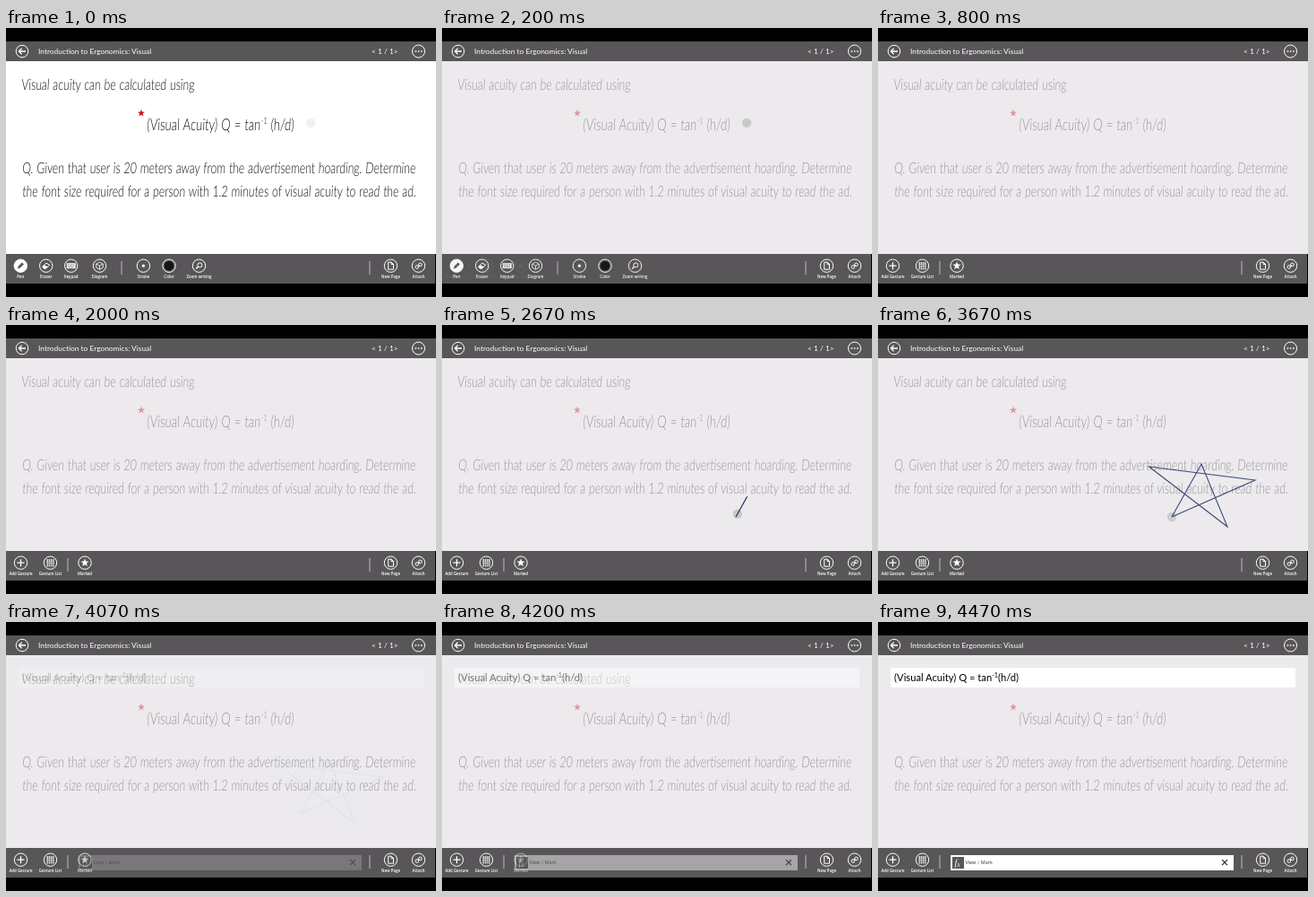
An HTML page that plays this animation: 480 px wide and 300 px high, repeating every 4.94 s.

```html
<!DOCTYPE html>
<html lang="en">
<head>
<meta charset="utf-8">
<title>Gesture marking</title>
<style>
  html, body { margin: 0; height: 100%; overflow: hidden; background: #000; }
  svg { display: block; width: 100%; height: 100%; }
  text { font-family: Lato, sans-serif; }
  .hand { font-size: 12.2px; font-weight: 300; word-spacing: .6px; fill: #111; }
  .title { font-size: 8.4px; fill: #fff; }
  .label { font: 600 4.4px "Open Sans", sans-serif; fill: #fff; text-anchor: middle; }
  .icon { fill: none; stroke: #fff; stroke-width: 1; }
  .solid { fill: #fff; stroke: none; }
  .bar { fill: #595659; stroke: none; }
  .rule { stroke: #d6d5d6; stroke-width: .8; }
</style>
</head>
<body>
<svg id="stage" viewBox="0 0 480 300"></svg>
<script>
const LOOP = 4940, TICK = 1000 / 15;
const corners = [[328, 214], [361, 155], [390, 225], [302.5, 158], [421, 173], [328, 214]];

const starPoints = (x, y, r) => Array.from({ length: 10 }, (_, i) => {
  const a = i * Math.PI / 5, d = i % 2 ? r * 0.42 : r;
  return `${(x + d * Math.sin(a)).toFixed(2)},${(y - d * Math.cos(a)).toFixed(2)}`;
}).join(' ');

// Tall, slightly slanted lettering for everything written with the pen.
const hand = (x, y, text, size = 12.2) =>
  `<text class="hand" style="font-size:${size}px" transform="matrix(1 0 -.08 1.4 ${x} ${y})">${text}</text>`;

const icon = (x, label, glyph, ring = 'none') => `
  <g class="icon" transform="translate(${x} 265.2)"><circle r="7.2" fill="${ring}"/>${glyph}</g>
  <text class="label" x="${x}" y="279">${label}</text>`;

const rule = x => `<path class="rule" d="M${x} 260v15"/>`;

const glyphs = {
  pen: '<path class="bar" d="M-3.4 3.4l1-3 4-4 2 2-4 4z"/>',
  eraser: '<path d="M-4 1l4-4 4 2-4 4h-2.4z"/><path class="solid" d="M-4 1l2-2 4 2-2 2h-2.4z"/>',
  keypad: '<path class="solid" d="M-5-3h10v6h-10z"/><path d="M-4-1.4h8M-4 .2h8M-3 1.8h6" stroke="#595659" stroke-width=".8" stroke-dasharray="1 .6"/>',
  diagram: '<path d="M0-4l3.8 2v4l-3.8 2-3.8-2v-4zM-3.8-2l3.8 2 3.8-2M0 0v4" stroke-width=".8"/>',
  dot: '<circle class="solid" r="1.6"/>',
  ink: '<circle r="5.2" fill="#151315" stroke="none"/>',
  zoom: '<circle cx=".8" cy="-.8" r="2.5"/><path d="M-1 1l-2.4 2.4" stroke-width="1.4"/>',
  page: '<path d="M-2.8-4h3.6l2.2 2.2v5.8h-5.8zM.6-4v2.4h2.4"/>',
  attach: '<circle cx="-1.7" cy="1.3" r="1.8"/><circle cx="1.9" cy="-1.3" r="1.8"/><path d="M-.8.6l1.8-1.2"/>',
  plus: '<path d="M-4 0h8M0-4v8" stroke-width="1.3"/>',
  grid: '<path d="M-4-3.3h8M-4-1.1h8M-4 1.1h8M-4 3.3h8" stroke-width="1.5" stroke-dasharray="1.5 .67"/>',
  star: `<polygon class="solid" points="${starPoints(0, 0, 4.8)}"/>`
};

const stage = document.getElementById('stage');
stage.innerHTML = `
  <path fill="#fff" d="M0 37h480v215H0z"/>
  ${hand(17, 68.8, 'Visual acuity can be calculated using')}
  ${hand(157, 114.3, '(Visual Acuity) Q = tan<tspan font-size="7.5" dy="-5.5">-1</tspan><tspan dy="5.5"> (h/d)</tspan>', 13)}
  ${hand(18, 162.2, 'Q. Given that user is 20 meters away from the advertisement hoarding. Determine')}
  ${hand(18, 188.4, 'the font size required for a person with 1.2 minutes of visual acuity to read the ad.')}
  <polygon fill="#cf1820" points="${starPoints(151, 95, 4.2)}"/>
  <path id="dim" fill="#e2dfe3" d="M0 37h480v215H0z"/>

  <path class="bar" d="M0 15h480v22H0zM0 252h479v33H0z"/>
  <g class="icon" stroke-width="1.2">
    <circle cx="18" cy="26" r="6.8"/><path d="M22 26h-7.6m3.2-3.2l-3.2 3.2 3.2 3.2" stroke-width="1.3"/>
    <circle cx="460.5" cy="26" r="7"/>
    <path d="M456.6 26h8" stroke-width="1.6" stroke-dasharray="1.6"/>
  </g>
  <text class="title" x="36" y="29">Introduction to Ergonomics: Visual</text>
  <text class="title" x="408" y="29">&lt; 1 / 1&gt;</text>

  ${rule(406)}
  ${icon(429.5, 'New Page', glyphs.page)}
  ${icon(460.5, 'Attach', glyphs.attach)}
  <g id="penTools">
    ${icon(16.3, 'Pen', glyphs.pen, '#fff')}
    ${icon(44.7, 'Eraser', glyphs.eraser)}
    ${icon(72.7, 'Keypad', glyphs.keypad)}
    ${icon(104.5, 'Diagram', glyphs.diagram)}
    ${rule(129)}
    ${icon(153.4, 'Stroke', glyphs.dot)}
    ${icon(182, 'Color', glyphs.ink)}
    ${icon(215.5, 'Zoom writing', glyphs.zoom)}
  </g>
  <g id="gestureTools">
    ${icon(16.5, 'Add Gesture', glyphs.plus)}
    ${icon(49.5, 'Gesture List', glyphs.grid)}
    ${rule(69)}
    <g id="marked">${icon(88, 'Marked', glyphs.star)}</g>
  </g>

  <g id="gesture">
    <polyline id="trace" fill="none" stroke="#1f3163" stroke-width="1.1"/>
    <path id="route" fill="none" d="M${corners.join('L')}"/>
  </g>
  <circle id="touch" r="5.2"/>

  <g id="result">
    <path fill="#fff" d="M14 51h452v22H14z"/>
    <text x="18" y="66" font-size="11.2">(Visual Acuity) Q = tan<tspan font-size="7.2" dy="-3.6">-1</tspan><tspan dy="3.6">(h/d)</tspan></text>
    <path fill="#fff" d="M81 260h316v17H81z"/>
    <path class="bar" d="M83 262h13v13H83z"/>
    <text x="85.4" y="271.5" fill="#fff" style="font:italic 10px 'Liberation Serif',serif">f<tspan font-size="7.5" dy="1">x</tspan></text>
    <text x="97.5" y="270.4" fill="#333" style="font:5.4px 'Open Sans',sans-serif">View :: Mark</text>
    <path d="M384 265.2l6 6m0-6l-6 6" stroke="#222" stroke-width="1.2"/>
  </g>`;

const el = id => document.getElementById(id);
const ramp = (t, from, to) => Math.min(1, Math.max(0, (t - from) / (to - from)));
const fade = (id, opacity) => el(id).setAttribute('opacity', opacity);
const routeLength = el('route').getTotalLength();

// Each side of the star takes 200 ms to draw.
function tracePoints(sides) {
  const i = Math.min(4, Math.floor(sides)), part = sides - i;
  const tip = corners[i].map((v, axis) => v + (corners[i + 1][axis] - v) * part);
  return [...corners.slice(0, i + 1), tip].join(' ');
}

function moveTouch(t, dim) {
  const eased = (1 - Math.cos(Math.PI * ramp(t, 2610, 3610))) / 2;
  const p = t < 2000 ? { x: 340.2, y: 105.8 } : el('route').getPointAtLength(routeLength * eased);
  el('touch').setAttribute('cx', p.x);
  el('touch').setAttribute('cy', p.y);
  const press = t < 799 ? 0.06 + 0.08 * dim
    : 0.15 * ramp(t, 2200, 2600) * (1 - ramp(t, 3600, 4090));
  fade('touch', press);
}

function render(t) {
  const dim = ramp(t, 0, 200);
  const swap = t < 199 ? 0 : Math.max(0.06, ramp(t, 265, 530));
  const shown = ramp(t, 3970, 4465);
  fade('dim', 0.65 * dim);
  fade('penTools', 1 - swap);
  fade('gestureTools', swap);
  fade('marked', 1 - shown);
  fade('result', shown);
  fade('gesture', 1 - ramp(t, 3600, 4090));
  el('trace').setAttribute('points', tracePoints(5 * ramp(t, 2590, 3590)));
  moveTouch(t, dim);
}

const start = performance.now();
function tick() {
  const t = (performance.now() - start) % LOOP;
  render(Math.floor((t + 4) / TICK) * TICK);
  requestAnimationFrame(tick);
}
tick();
</script>
</body>
</html>
```
